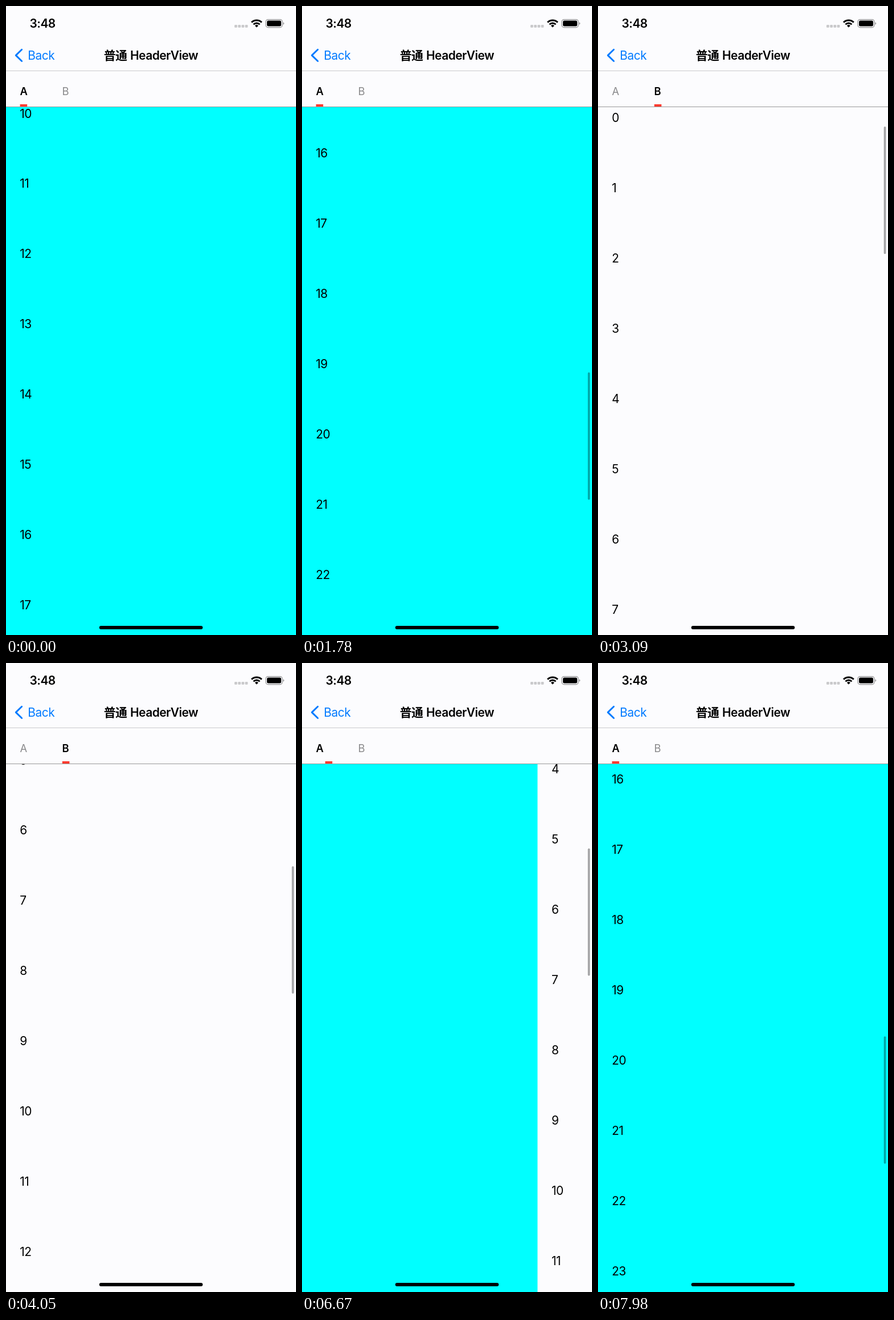
Recreate the animation shown at these times as an HTML page. Size 509x1101 px, loop 8 s.

```html
<!DOCTYPE html>
<html lang="zh">
<head>
<meta charset="utf-8">
<title>HeaderView</title>
<style>
html, body { margin: 0; width: 100%; height: 100%; overflow: hidden; background: #fcfcfe; }
svg { display: block; width: 509px; height: 1101px; }
text { font: 400 20.9px Inter, "Noto Sans CJK SC", "Noto Sans CJK", sans-serif; letter-spacing: -.5px; }
.bold { font-weight: 600; }
.tab { font-size: 18.4px; letter-spacing: -.2px; fill: #8a8a8c; }
.tab.on { font-weight: 600; fill: #000; }
</style>
</head>
<body>
<svg viewBox="0 0 509 1101">
  <defs><clipPath id="body"><rect y="177" width="509" height="924"/></clipPath></defs>
  <rect width="509" height="1101" fill="#fcfcfe"/>
  <g clip-path="url(#body)">
    <g id="pageA"><rect y="177" width="509" height="924" fill="#0ff"/><g id="listA"></g></g>
    <g id="pageB"><rect y="177" width="509" height="924" fill="#fcfcfe"/><g id="listB"></g></g>
    <rect id="bar" x="501.7" width="3.7" height="223" rx="1.85" fill="#000" fill-opacity=".35"/>
  </g>

  <!-- status bar -->
  <text class="bold" x="41.5" y="38.2">3:48</text>
  <g fill="#c9c9cb">
    <rect x="401" y="33" width="4.8" height="4.8" rx="1.2"/>
    <rect x="407.2" y="33" width="4.8" height="4.8" rx="1.2"/>
    <rect x="413.4" y="33" width="4.8" height="4.8" rx="1.2"/>
    <rect x="419.6" y="33" width="4.8" height="4.8" rx="1.2"/>
  </g>
  <g fill="none" stroke="#000" stroke-width="2.9">
    <path d="M431 28.6a12.9 12.9 0 0 1 17.8 0"/>
    <path d="M434.4 32.2a8 8 0 0 1 11 0"/>
    <path d="M436.9 34.4a4.6 4.6 0 0 1 6 0l-3 3.2z" fill="#000" stroke="none"/>
  </g>
  <rect x="456" y="23.6" width="29" height="14" rx="4" fill="none" stroke="#8f8f91" stroke-width="1.2"/>
  <rect x="458" y="25.6" width="25" height="10" rx="2.4"/>
  <path d="M486.5 28.3q1.7 .8 1.7 2.3t-1.7 2.3z" fill="#8f8f91"/>

  <!-- navigation -->
  <path d="M27.7 76.3L17.3 86.4L27.7 96.5" fill="none" stroke="#007aff" stroke-width="2.9" stroke-linecap="round" stroke-linejoin="round"/>
  <text x="38.3" y="93.6" fill="#007aff">Back</text>
  <text class="bold" x="171.7" y="93.6">普通</text>
  <text class="bold" x="218" y="93.6">HeaderView</text>
  <rect y="113" width="509" height="1" fill="#c9c9cb"/>

  <!-- tabs -->
  <text class="tab" id="tabA" x="24.6" y="156.4">A</text>
  <text class="tab" id="tabB" x="98.4" y="156.4">B</text>
  <rect id="mark" y="172" width="12.6" height="4" fill="#ff3b30"/>
  <rect y="176" width="509" height="1" fill="#999"/>

  <rect x="163.7" y="1085" width="181.6" height="6" rx="3"/>
</svg>
<script>
const LOOP = 8000, WIDTH = 509, ROW = 122.95;
const $ = id => document.getElementById(id);

// Each move: start ms, end ms, target value, ease-out power
const scrollA = [-1041.5,
  [500, 600, -1054, 1], [780, 1360, -1708.5, 2.2], [1770, 1780, -1709.2, 1],
  [7050, 7330, -1737, 2], [7740, 7980, -1763.2, 1.6]];
const scrollB = [196,
  [3090, 3150, 190, 1], [3330, 4050, -444.7, 2.2], [4530, 5050, -317, 2.2],
  [5460, 5600, -307, 1.6], [5840, 5880, -306.3, 1]];
const slide = [WIDTH,
  [2090, 2570, 0, 2.5], [6190, 6330, 30, 1], [6530, 6880, WIDTH, 3.13]];

function valueAt([value, ...moves], t) {
  for (const [start, end, to, power] of moves) {
    if (t < start) break;
    const u = Math.min(1, (t - start) / (end - start));
    value += (to - value) * (1 - (1 - u) ** power);
  }
  return value;
}

function fillList(list) {
  for (let n = 0; n < 30; n++) {
    const row = document.createElementNS("http://www.w3.org/2000/svg", "text");
    row.setAttribute("x", 24.3);
    row.setAttribute("y", n * ROW + 7.5);
    row.textContent = n;
    list.append(row);
  }
}

const move = (id, x, y) => $(id).setAttribute("transform", `translate(${x} ${y})`);

function draw(t) {
  const x = valueAt(slide, t), p = x / WIDTH;
  const a = valueAt(scrollA, t), b = valueAt(scrollB, t);
  const onB = t >= 2570 && t < 6880;

  move("pageA", x - WIDTH, 0);
  move("pageB", x, 0);
  move("listA", 0, a);
  move("listB", 0, b);
  // The incoming page stays empty until the swipe has settled
  $("listA").style.display = onB ? "none" : "";
  $("listB").style.display = t >= 2570 ? "" : "none";
  if (t >= 6880) $("listB").style.display = "none";

  $("bar").setAttribute("y", 211 + .2258 * (196 - (onB ? b : a)));
  $("bar").setAttribute("opacity", Math.min(1, Math.max(0, (t - 500) / 100)));

  const away = 1 - p;
  $("mark").setAttribute("x", 24.6 + 74.2 * (away + .19 * away * p));
  $("tabA").classList.toggle("on", p >= .5);
  $("tabB").classList.toggle("on", p < .5);
}

fillList($("listA"));
fillList($("listB"));
const began = performance.now();
function tick() {
  draw((performance.now() - began) % LOOP);
  requestAnimationFrame(tick);
}
tick();
</script>
</body>
</html>
```
